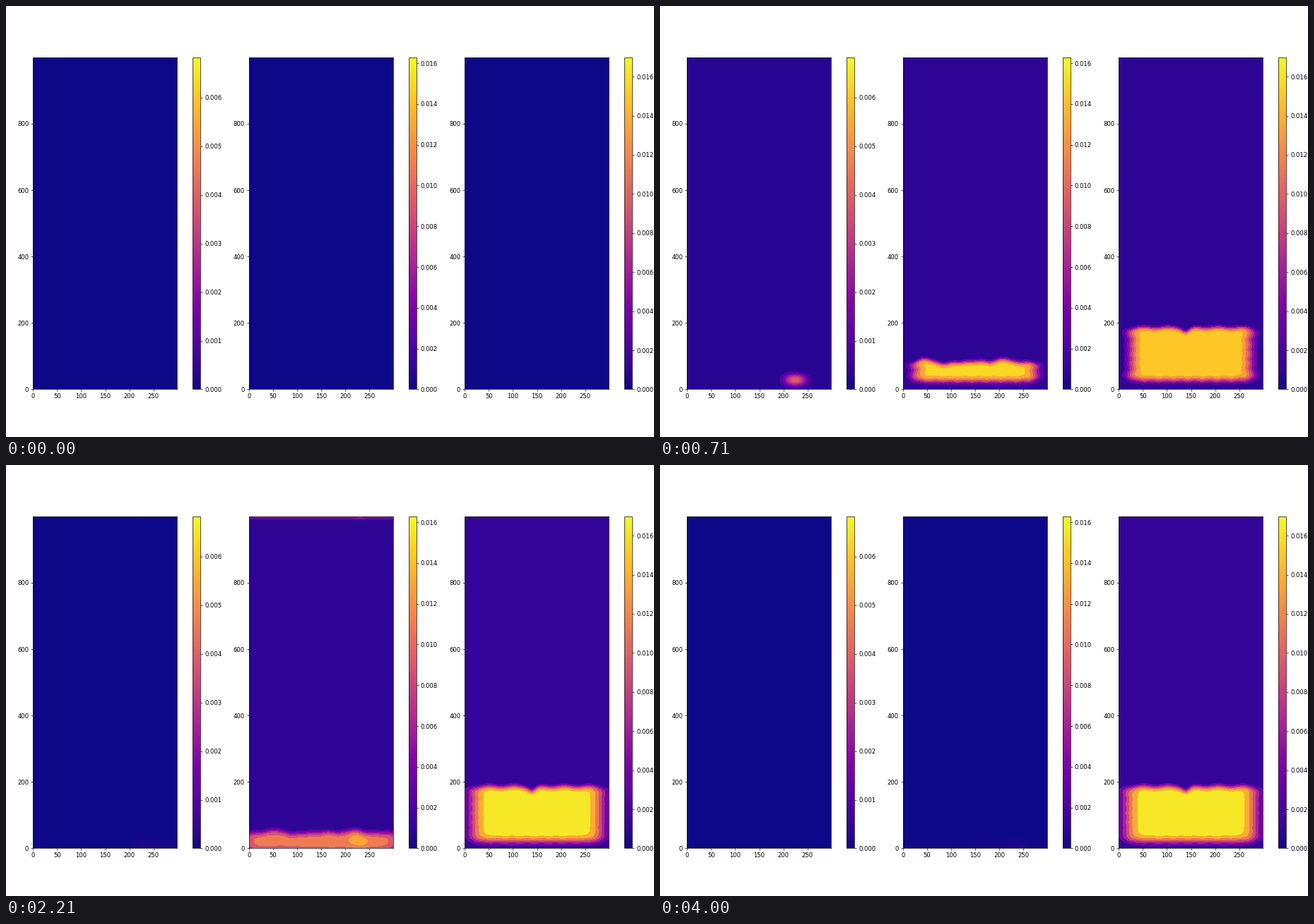
Animation, 917 px wide and 611 px high, one loop 4080 ms. Source, as a matplotlib script:

```python
import numpy as np
import matplotlib.pyplot as plt
from matplotlib.animation import FuncAnimation
from matplotlib.cm import ScalarMappable
from matplotlib.colors import Normalize

W, H, DPI = 917, 611, 64
LOOP, STEP = 4080, 40
K = 61.1 / DPI  # point scale of the drawing

plt.rcParams.update({
    "font.family": "DejaVu Sans", "font.size": 10 * K,
    "axes.linewidth": 0.8 * K,
    "xtick.major.size": 3.5 * K, "ytick.major.size": 3.5 * K,
    "xtick.major.width": 0.8 * K, "ytick.major.width": 0.8 * K,
    "xtick.major.pad": 3.5 * K, "ytick.major.pad": 3.5 * K,
})

# fine rows only where something happens
x = np.linspace(0, 299, 151)
y = np.concatenate([np.arange(0, 217, 1.5), np.arange(240, 971, 73),
                    np.arange(980, 1000, 1.0)])
X, Y = np.meshgrid(x, y)


def rise(u):
    """Soft step from 0 to 1."""
    return 0.5 * (1 + np.tanh(0.8 * u))


def bell(s, mid, width):
    return np.exp(-0.5 * ((s - mid) / width) ** 2)


def with_wrap(field):
    """The bottom row leaks through to the upper border."""
    return field + 0.8 * field[0] * np.exp(-(999 - Y) / 6) * (Y > 900)


def spots(n):
    """Small sources that merge, spread, sink and fade."""
    sx = 4 + 1.7 * n
    sy = min(5 + 1.1 * n, 17)
    cx = 221 + 0.07 * n ** 2
    cy = 34 / (1 + (n / 11.5) ** 3)
    gap = max(21 - 2.2 * n, 0)
    grow = 1 - np.exp(-0.8 * n)
    amp = 0.365 * grow * np.exp(-(n / 14) ** 2) / (sx * sy)
    lone = 0.004 * grow * np.exp(-((n - 2) / 2) ** 2)

    field = lone * bell(X, 105, sx) * bell(Y, 35, sy)
    for side in (-1, 0, 1):
        lift = 0.35 * gap * (side == 0)
        field += amp * bell(X, cx + side * gap, sx) * bell(Y, cy + lift, sy)
    return with_wrap(field)


def block(n, edge, low, high, low_s, high_s):
    """Area with four soft edges; its ragged sides smooth out with time."""
    spread = min(n / 11, 1)
    rough = 1 - 0.8 * spread
    corners = bell(Y, low + 12, 7) + bell(Y, high - 10, 7)
    inset = edge + rough * (5 - 12 * corners + 2 * np.sin(Y / 4.5))
    side = 7 + 9 * spread
    low = low + 2 * rough * np.sin(X / 4.8)
    return (rise((X - inset) / side) * rise((299 - inset - X) / side)
            * rise((Y - low) / low_s) * rise((high - Y) / high_s))


def strip(n):
    """Thin layer that builds up, then sinks through the floor."""
    edge = 38 - 21 * min(n / 11, 1) - 5.5 * max(n - 17, 0)
    drift = 0.02 * n ** 2
    u = X - drift
    waves = (12 * bell(u, 45, 14) - 6 * bell(u, 82, 14)
             + 4 * bell(u, 155, 12) + 12 * bell(u, 208, 11)
             + np.sin(X / 5))
    high = 84 / (1 + (n / 23) ** 2.5) + (0.5 + 0.5 * bell(n, 12, 6)) * waves
    low = max(41 - 2.2 * n, -8)

    late = rise((n - 23) / 2)
    gain = (1 - 0.04 * bell(X, 80, 14) * bell(n, 13, 4)
            + late * (0.48 * bell(X, 229, 14) + 0.12 * bell(X, 170, 20)
                      - 0.12 * bell(X, 62, 14)))
    amp = 0.0165 * np.tanh(0.236 * n) / (1 + np.exp((n - 25.5) / 3.6))
    return with_wrap(amp * gain * block(n, edge, low, high,
                                        5 + 0.7 * min(n, 13), 6 + 0.2 * n))


def slab(n):
    """Thick layer that builds up and stays."""
    spread = min(n / 11, 1)
    high = 184 + 2 * np.cos((X - 50) / 8.3) - 12 * bell(X, 140, 8)
    amp = 0.0168 * np.tanh(0.236 * n)
    return with_wrap(amp * block(n, 38 - 21 * spread, 37 - 14.5 * spread,
                                 high, 6 + 6.5 * spread, 5 + 3.5 * spread))


fig = plt.figure(figsize=(W / DPI, H / DPI), dpi=DPI, facecolor="white")
cmap = plt.get_cmap("plasma")
TOP, BOTTOM, PITCH = 73.3, 543.45, 305.5


def add_axes(left, width):
    return fig.add_axes([left / W, 1 - BOTTOM / H,
                         width / W, (BOTTOM - TOP) / H])


def add_panel(i, top, tick):
    ax = add_axes(38.3 + i * PITCH, 203.9)
    ax.set_facecolor(cmap(0.0))
    ax.set_xlim(0, 299)
    ax.set_ylim(0, 999)
    ax.set_xticks(range(0, 251, 50))
    ax.set_yticks(range(0, 801, 200))
    cax = add_axes(264.3 + i * PITCH, 11)
    fig.colorbar(ScalarMappable(Normalize(0, top), cmap), cax=cax,
                 ticks=np.arange(0, top, tick), format="%.3f")
    return ax


PANELS = [(add_panel(i, top, tick), field, top)
          for i, (field, top, tick) in enumerate([
              (spots, 0.00682, 0.001),
              (strip, 0.01627, 0.002),
              (slab, 0.01697, 0.002)])]

# 10 states per second, held on a 24 Hz clock
STARTS = [10 * round(round(2.4 * n) * 100 / 24) for n in range(41)]
layers = []


def draw(k):
    while layers:
        layers.pop().remove()
    now = k * STEP + 30
    n = sum(s <= now for s in STARTS) - 1
    for ax, field, top in PANELS:
        z = field(n)
        if z.max() > 1e-7:
            layers.append(ax.contourf(x, y, z, cmap=cmap, vmin=0, vmax=top))
    return layers


anim = FuncAnimation(fig, draw, frames=LOOP // STEP, interval=STEP,
                     init_func=lambda: draw(0), repeat=True, repeat_delay=0,
                     blit=False)
plt.show()
```
